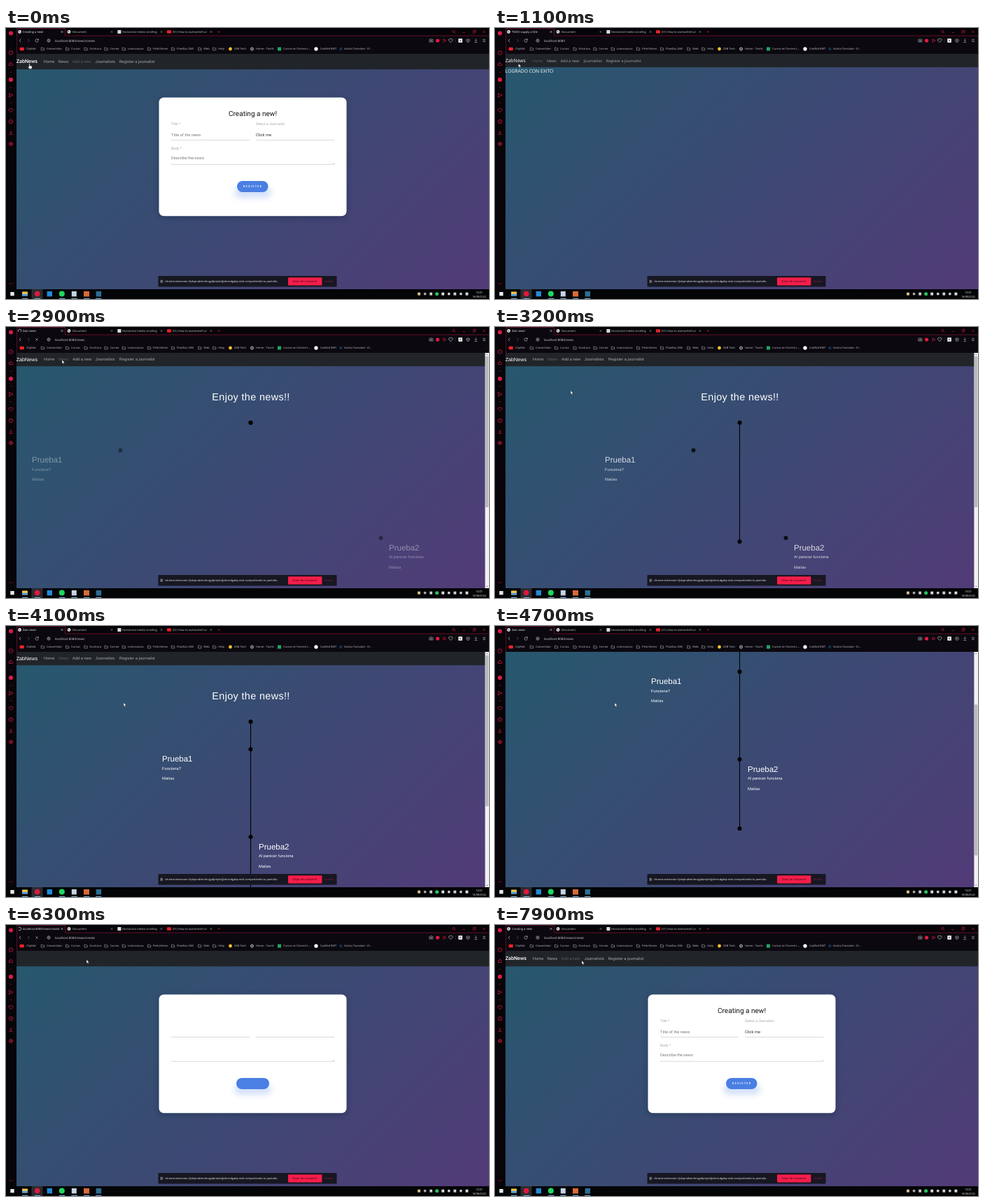
Write an HTML page that moves like this. It is 690 px wide and 388 px high and loops after 8 s.

```html
<!DOCTYPE html>
<html lang="en">
<head>
<meta charset="utf-8">
<title>Browser walkthrough</title>
<style>
html, body { margin: 0; width: 100%; height: 100%; overflow: hidden; background: #07050a; }
svg { display: block; width: 100vw; height: 100vh; }
text { text-rendering: geometricPrecision; white-space: pre; }
.ui { font-family: "Open Sans", "Noto Sans", sans-serif; }
.rob { font-family: Roboto, sans-serif; }
.ari { font-family: "Liberation Sans", Arial, sans-serif; }
</style>
</head>
<body>
<svg id="stage" viewBox="0 0 690 388" xmlns="http://www.w3.org/2000/svg"></svg>
<script>
const LOOP = 8000, STEP = 100;
const RED = '#d81b45';
const stage = document.getElementById('stage');

// Markup helpers
const text = (x, y, s, size, fill, cls = 'ui', extra = '') =>
  `<text x="${x}" y="${y}" font-size="${size}" fill="${fill}" class="${cls}" ${extra}>${s}</text>`;
const rect = (x, y, w, h, fill, extra = '') =>
  `<rect x="${x}" y="${y}" width="${w}" height="${h}" fill="${fill}" ${extra}/>`;
const dot = (x, y, r, fill, extra = '') => `<circle cx="${x}" cy="${y}" r="${r}" fill="${fill}" ${extra}/>`;
const line = (d, color, w = 0.7, extra = '') =>
  `<path d="${d}" fill="none" stroke="${color}" stroke-width="${w}" ${extra}/>`;
const group = (id, body, extra = '') => `<g id="${id}" ${extra}>${body}</g>`;

const globe = (x, y, c = '#d5d5da') =>
  dot(x, y, 2.2, 'none', `stroke="${c}" stroke-width=".6"`) +
  line(`M${x - 2.2} ${y}h4.4M${x} ${y - 2.2}q-2 2.2 0 4.4q2 -2.2 0 -4.4`, c, 0.4);
const pageIcon = (x, y) => dot(x, y, 2.4, '#e8e8ea') + line(`M${x - 1.6} ${y - 1}l1.6 .6l.4 1.6`, '#333', 0.8);
const folder = (x, y) => line(`M${x - 2.1} ${y + 1.8}v-3.7h1.6l.7 .8h2v2.9z`, '#b9b9c0', 0.55);
const cross = (x, y, r, c, w = 0.6) => line(`M${x - r} ${y - r}l${2 * r} ${2 * r}m0 ${-2 * r}l${-2 * r} ${2 * r}`, c, w);
const heart = (x, y, c) => line(`M${x} ${y + 2.6}l-2.6 -2.7a1.5 1.5 0 0 1 2.6 -1.8a1.5 1.5 0 0 1 2.6 1.8z`, c, 0.7);

function sidebar() {
  return rect(0, 0, 15, 374, '#08050a') +
    dot(7, 7.5, 3, RED) +
    dot(7, 35.5, 2.8, 'none', `stroke="${RED}" stroke-width=".7"`) + line('M7 36l1.4 -1.6', RED) +
    line('M4.4 53.5v-2.6h2v-2l3 2.4v2.2z', RED) +
    line('M5.5 63.3h3M5.5 85h3M5.5 107h3', '#7c1730', 0.7) +
    dot(7, 74, 3.1, RED) +
    line('M4.3 93.6l5.6 2.6l-5.6 2.8l1 -2.8z', RED) +
    heart(7, 118, RED) +
    dot(7, 134, 2.8, 'none', `stroke="${RED}" stroke-width=".7"`) + line('M7 132.2v2l1.3 .6', RED, 0.6) +
    line('M7 147v4M5.5 149.6l1.5 1.5l1.5 -1.5M4.4 152.4h5.2', RED) +
    dot(7, 166, 2.2, 'none', `stroke="${RED}" stroke-width="1.2" stroke-dasharray="1.1 .5"`) + dot(7, 166, 1.3, 'none', `stroke="${RED}" stroke-width=".6"`) +
    [5, 7, 9].map(x => dot(x, 366, 0.55, RED)).join('');
}

function tabStrip() {
  const tabs = [[95, 151, 'Document'], [166, 222, 'Horizontal media scrolling'], [238, 293, '(51) How to overwrite/Cur']];
  return rect(15, 0, 675, 37, '#0b080f') + rect(84, 0, 606, 11, '#060408') +
    line('M15.3 37V.4H84.5V11H690', '#a3153a', 0.6) +
    pageIcon(90, 5.5) + rect(159.4, 3, 5, 5, '#dddde0') + rect(230, 3.3, 6, 4.4, '#e8222c', 'rx="1"') +
    tabs.map(([x, end, s]) => text(x, 7.1, s, 4.1, '#c9c9ce') + cross(end, 5.5, 1.3, '#a9a9b0', 0.55)).join('') +
    cross(80, 5.5, 1.4, '#d5d5da') +
    line('M302.6 5.5h3M304.1 4v3', RED, 0.6) +
    dot(639.5, 5, 1.6, 'none', `stroke="${RED}" stroke-width=".6"`) + line('M640.7 6.2l1.5 1.5', RED, 0.6) +
    line('M652.4 6.5h3.4', RED, 0.6) + line('M667 4.4h3v3h-3zM668 4.2v-1h3v3h-1', RED, 0.5) + cross(683, 5.4, 1.6, RED);
}

function toolbar() {
  const c = '#c4c4ca';
  return line('M21.3 15.8l-2.2 2.2l2.2 2.2', c) + line('M31.3 15.8l2.2 2.2l-2.2 2.2', '#66666e') +
    globe(61, 18, '#b5b5bb') +
    line('M604.8 16.6h1.2l.6 -.9h1.5l.6 .9h1.2v3.4h-5.1z', c, 0.6) + dot(607.4, 18.2, 0.9, c) +
    dot(616.6, 18, 2.6, '#e8183f') + line('M625 15.8l4 2.2l-4 2.2z', RED) + heart(635.3, 18, c) +
    line('M642 15.3v5.4', '#44444c', 0.5) + rect(646.3, 15.2, 5.6, 5.6, '#f4f4f4') + rect(648.6, 17, 1, 2, '#222') +
    line('M657.8 16.7l2.2 -1.1l2.2 1.1v2.7l-2.2 1.1l-2.2 -1.1zM657.8 16.7l2.2 1.1l2.2 -1.1M660 17.8v2.7', c, 0.5) +
    line('M671.3 15.3v3.6M669.9 17.6l1.4 1.4l1.4 -1.4M669.2 20.6h4.2', c, 0.6) +
    line('M681 16.4h4M681 18h4M681 19.6h4', c, 0.5);
}

function bookmarks() {
  const folders = [[52.3, 'Convertidor'], [87.5, 'Cursos'], [114, 'Escritura'], [143, 'Correo'], [168.3, 'Licenciatura'],
    [204.5, 'Pelis/Series'], [238.5, 'Planillas ZAB'], [276.7, 'Web'], [297.6, 'Help']];
  const links = [[29, 'ClipNid'], [326, 'ZAB Tech'], [357, 'Home - Tovrik'], [396, 'Cursos en Torrent L...'],
    [449, 'CodNid RMT'], [483, 'Voztra Translate - El...']];
  return folders.map(([x, s]) => folder(x, 30) + text(x + 5.6, 31.4, s, 4, '#c3c3c8')).join('') +
    links.map(([x, s]) => text(x, 31.4, s, 4, '#c3c3c8')).join('') +
    rect(19.6, 27.8, 6.2, 4.5, '#f0222c', 'rx="1"') + dot(320.5, 30, 2.4, '#f4c32c') + globe(351.5, 30) +
    rect(388, 27.5, 5, 5, '#20a565') + dot(443, 30, 2.7, '#f2f2f2') + dot(478.3, 30, 2.3, '#12304a');
}

function taskbar() {
  const tray = ['#d6c58a', '#aaa', '#c9c9c9', '#26c860', '#ddd', '#d4d4d4', '#c9d0dc', '#ccc', '#ddd'];
  const shapes = tray.map((c, i) => {
    const x = 590 + i * 8.55;
    return i % 2 ? dot(x, 380.7, i === 3 ? 2.5 : 1.9, c) : rect(x - 1.9, 378.7, 3.8, 4, c);
  }).join('');
  return rect(0, 374, 690, 14, '#040507') + rect(36.5, 374, 16, 14, '#2b2d31') +
    rect(6.3, 378, 5.4, 5.4, '#e8eaec') +
    rect(23, 377.5, 8, 6, '#f2c64d', 'rx=".6"') + rect(23, 380.8, 8, 2.7, '#4a9ee0') +
    dot(44.7, 380.6, 3.8, '#e0183d') + rect(58.6, 377, 7.4, 7.4, '#2588d8') + dot(79.8, 380.6, 4, '#1ed760') +
    rect(93.8, 377, 7, 7.4, '#c5d3e5') + rect(111, 377, 8, 7.5, '#d96a37') + rect(128.6, 377, 7.5, 7.5, '#2d6e94') +
    [23, 40.8, 76, 93.4, 111, 128].map(x => rect(x, 387, 8.4, 1, '#78b4e0')).join('') + shapes +
    text(676, 379.5, '13:01', 4, '#eee', 'ui', 'text-anchor="middle"') +
    text(676, 385.8, '18/08/2022', 3.75, '#eee', 'ui', 'text-anchor="middle"');
}

function shareBar() {
  return rect(217.5, 355, 255, 15.6, '#171722', 'rx="1"') + line('M221.4 360.8v4M223.2 360.8v4', '#e8e8ee', 0.7) +
    text(227, 364.4, 'chrome-extension://jdopnakmnhncgpfpmjnidjjohmcdgabp está compartiendo tu pantalla.', 3.85, '#f0f0f4') +
    rect(403, 357.2, 48.4, 11.3, '#f51e4b', 'rx="1"') + text(427.2, 364.3, 'Dejar de compartir', 4, '#3c0714', 'ui', 'text-anchor="middle"') +
    text(455, 364.3, 'Ocultar', 3.8, '#a01a3a');
}

// Site header; `active` is the dimmed link of the current page
function navbar(h, y, cls, size, xs, active) {
  const names = ['Home', 'News', 'Add a new', 'Journalists', 'Register a journalist'];
  return rect(15, 37, 675, h, '#212529') + group(`${cls}-links`,
    text(14.7, y + 0.4, 'ZabNews', cls === 'ui' ? 6.8 : 7.2, '#fff', cls, 'font-weight="500"') +
    names.map((s, i) => text(xs[i], y, s, size, i === active ? '#5a5f63' : '#a4a7a9', cls, `id="${cls}-${i}"`)).join(''));
}

function homePage() {
  return navbar(19.2, 48.6, 'ui', 5.4, [53, 74, 93.7, 126.7, 158.8], 0) +
    text(14.8, 63.7, 'LOGRADO CON EXITO', 6.75, '#fff');
}

function newsItem(id, x, dotY, title, body) {
  const put = (dy, s, size) => text(x, dotY + dy, s, size, '#fff', 'ari');
  return group(id, dot(349.5, dotY, 3, '#000') + put(17.6, title, 11.5) + put(29.4, body, 5.75) + put(43.8, 'Matías', 5.75));
}

function newsPage() {
  return group('scroller',
    navbar(19.2, 48.1, 'ari', 5.75, [54, 75, 95, 127.8, 161.8], 1) +
    text(350, 104.8, 'Enjoy the news!!', 14.4, '#fff', 'ari', 'text-anchor="middle" letter-spacing=".36"') +
    '<path id="rail" stroke="#000" stroke-width="1.1"/>' + dot(349.5, 137, 3, '#000') + dot(349.5, 137, 3, '#000', 'id="railEnd"') +
    newsItem('left', 223, 176.4, 'Prueba1', 'Funciona?') + newsItem('right', 361, 302, 'Prueba2', 'Al parecer funciona')) +
    rect(684.4, 37, 5.6, 337, '#f1f1f1') + rect(685, 42, 4.4, 216, '#b9b9bb', 'id="thumb"') +
    line('M686 40.3l1.2 -1.4l1.2 1.4M686 370.6l1.2 1.4l1.2 -1.4', '#555', 0.6);
}

function createPage() {
  const rob = (x, y, s, size, c, extra) => text(x, y, s, size, c, 'rob', extra);
  return navbar(22.2, 49.8, 'rob', 5.75, [53.8, 74.8, 94.8, 127.5, 161.8], 2) +
    rect(219, 102, 267, 169, '#10203a', 'rx="7" opacity=".45" filter="url(#soft)"') +
    rect(218.5, 99.5, 268, 169.7, '#fff', 'rx="7"') +
    line('M236 160.5h112M357 160.5h112.3M236 195.3h233.3', '#c9cacc', 0.7) + line('M466.8 194.8l2 -2M468 194.8l.8 -.8', '#888', 0.4) +
    rect(326, 228, 53, 15, '#4b80e6', 'rx="7.5" opacity=".24" filter="url(#soft)"') +
    rect(330, 219, 44.5, 16, '#4a7fe3', 'rx="8" id="button"') +
    group('formText',
      rob(352.5, 126.2, 'Creating a new!', 10.05, '#111', 'text-anchor="middle"') +
      rob(236, 139.2, 'Title *', 5, '#a6a6a6') + rob(357, 139.2, 'Select a Journalist', 5, '#a6a6a6') +
      rob(236, 154.5, 'Title of the news', 5.75, '#777') + rob(357, 154.5, 'Click me', 5.75, '#333') +
      rob(236, 173.8, 'Body *', 5, '#a6a6a6') + rob(236, 187.9, 'Describe the news', 5.75, '#777') +
      rob(338.8, 228.4, 'REGISTER', 3.95, '#fff', 'letter-spacing="1.2" font-weight="500"'));
}

stage.innerHTML = `<defs>
  <linearGradient id="sky" gradientUnits="userSpaceOnUse" x1="99.5" y1="-47.5" x2="605.5" y2="458.5">
    <stop stop-color="#26586e"/><stop offset="1" stop-color="#523b78"/></linearGradient>
  <filter id="soft" x="-30%" y="-60%" width="160%" height="220%"><feGaussianBlur stdDeviation="4"/></filter>
  <clipPath id="view"><rect x="15" y="37" width="675" height="337"/></clipPath></defs>` +
  rect(0, 0, 690, 388, '#07050a') + tabStrip() + toolbar() + bookmarks() +
  group('pages', rect(15, 37, 675, 337, 'url(#sky)') + group('home', homePage()) + group('news', newsPage()) + group('create', createPage()),
    'clip-path="url(#view)"') +
  sidebar() + shareBar() + taskbar() +
  text(24, 7.1, '', 4.1, '#f2f2f4', 'ui', 'id="tabTitle"') + text(70, 19.6, '', 4.45, '#d8d8dc', 'ui', 'id="url"') +
  group('idle', pageIcon(19.5, 5.5) + line('M46 16.8a2.2 2.2 0 1 0 .3 1.8M46.3 15.5v1.7h-1.7', '#c4c4ca')) +
  group('busy', cross(44, 18, 1.7, '#c4c4ca') + line('M19.5 3.3a2.2 2.2 0 1 1 -2.2 2.2', '#d8d8dc', 0.7, 'id="spinner"')) +
  group('cursor',
    group('arrow', '<path d="M0 0v5.3l1.2 -1.1l.9 2l.9 -.4l-.9 -1.9h1.7z" fill="#fff" stroke="#111" stroke-width=".35"/>') +
    group('hand', '<path d="M-.6 .5q.6 -1 1.2 0v2.4l2.6 .6q.7 .3 .5 1.2l-.6 2.9h-3.3l-2 -2.8q.4 -1 1.6 .1z" fill="#fff" stroke="#111" stroke-width=".35"/>'));

const el = id => document.getElementById(id);
const set = (id, attrs) => { for (const k in attrs) el(id).setAttribute(k, attrs[k]); };
const show = (id, on) => set(id, { display: on ? 'inline' : 'none' });
const clamp = v => Math.min(1, Math.max(0, v));
const smooth = v => v * v * (3 - 2 * v);

// CSS "ease": cubic-bezier(.25, .1, .25, 1)
function ease(x) {
  const curve = (u, a, b) => 3 * u * (1 - u) ** 2 * a + 3 * u * u * (1 - u) * b + u ** 3;
  let lo = 0, hi = 1;
  for (let i = 0; i < 20; i++) {
    const mid = (lo + hi) / 2;
    if (curve(mid, 0.25, 0.25) < x) lo = mid; else hi = mid;
  }
  return curve(lo, 0.1, 1);
}

// Pointer path: time, x, y
const path = [[0, 33.5, 51], [1600, 33.5, 51], [2000, 60, 56], [2400, 80, 47], [2900, 80, 47], [3200, 108, 91], [3600, 130, 106],
  [4200, 171, 110], [5400, 171, 110], [6000, 115, 45.5], [6200, 115, 45.5], [6300, 115, 49.5], [6400, 115, 60], [6500, 115, 66],
  [7000, 134, 122], [7200, 134, 122], [7700, 124, 51], [8000, 124, 51]];
function pointer(t) {
  const i = path.findIndex((p, k) => k && t < p[0]);
  const [t0, x0, y0] = path[i - 1], [t1, x1, y1] = path[i];
  const k = smooth((t - t0) / (t1 - t0));
  return [x0 + (x1 - x0) * k, y0 + (y1 - y0) * k];
}

const sites = {
  home: ['TODO supply a title', 'localhost:8080'],
  news: ['Zab news!', 'localhost:8080/news'],
  create: ['Creating a new!', 'localhost:8080/news/create']
};
const within = (t, a, b) => t >= a && t < b;

function draw(t) {
  const page = within(t, 200, 2900) ? 'home' : within(t, 2900, 6300) ? 'news' : 'create';
  const bare = within(t, 6300, 6400);
  const busy = within(t, 100, 300) || within(t, 2700, 3000) || within(t, 6200, 6400);
  for (const p in sites) show(p, p === page);
  el('tabTitle').textContent = bare ? sites.create[1] : sites[page][0];
  el('url').textContent = sites[page][1];
  show('busy', busy);
  show('idle', !busy);
  set('spinner', { transform: `rotate(${t * 0.45} 19.5 5.5)` });

  // The form shows before its web font arrives
  show('formText', !bare);
  show('rob-links', !bare);
  set('button', { x: bare ? 329 : 330, width: bare ? 47 : 44.5 });

  const k = ease(clamp((t - 2900) / 800)), shift = 186 * (1 - k), end = 137 + 264 * k;
  set('rail', { d: `M349.5 137V${end}` });
  set('railEnd', { cy: end });
  set('left', { transform: `translate(${-shift})`, opacity: 0.4 + 0.6 * k });
  set('right', { transform: `translate(${shift})`, opacity: 0.4 + 0.6 * k });

  const scroll = 111 * (smooth(clamp((t - 4100) / 500)) - smooth(clamp((t - 5200) / 400)));
  set('scroller', { transform: `translate(0 ${-scroll})` });
  set('thumb', { y: 42 + scroll * 0.635 });

  set('ui-1', { fill: within(t, 2300, 2900) ? '#fff' : '#a4a7a9' });
  set('ari-2', { fill: within(t, 5900, 6300) ? '#fff' : '#a4a7a9' });

  const hand = t < 200 || within(t, 2400, 2600) || within(t, 5900, 6200);
  show('hand', hand);
  show('arrow', !hand);
  set('cursor', { transform: `translate(${pointer(t)})` });
}

function tick(now) {
  draw(Math.floor((now % LOOP) / STEP) * STEP);
  requestAnimationFrame(tick);
}
draw(0);
requestAnimationFrame(tick);
</script>
</body>
</html>
```
